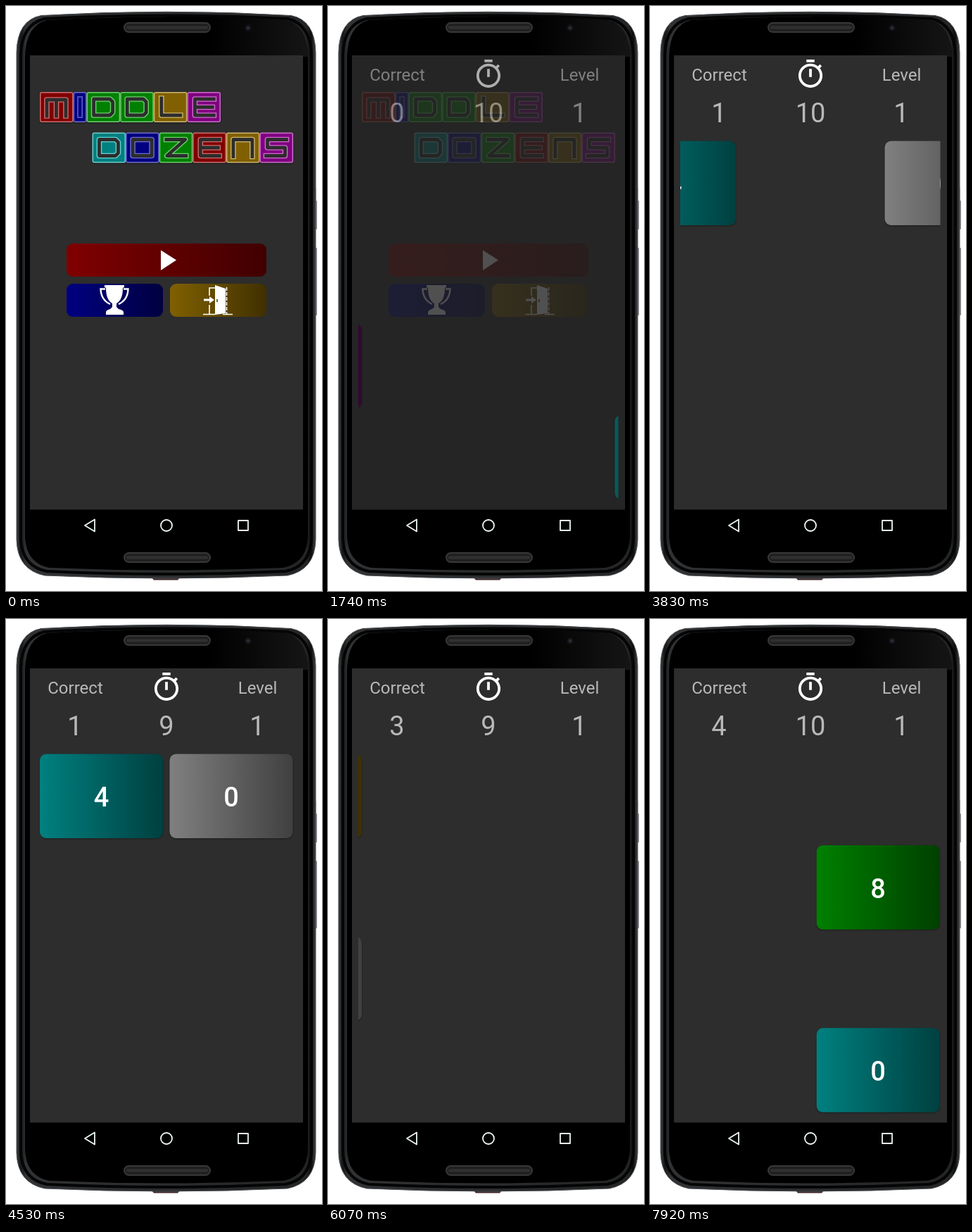
Write an HTML page that moves like this. It is 449 px wide and 830 px high and loops after 8000 ms.

```html
<!DOCTYPE html>
<html lang="en">
<head>
<meta charset="utf-8">
<title>Number game</title>
<style>
  html, body { margin: 0; width: 100%; height: 100%; overflow: hidden; background: #fff; }
  svg { display: block; width: 449px; height: 830px; }
  text { font-family: Roboto, sans-serif; text-anchor: middle; }
  .label { font-size: 24px; fill: #b9b9b9; }
  .count { font-size: 38px; fill: #b9b9b9; }
  .card text { font-size: 38px; font-weight: 500; fill: #fff; }
  .shade { filter: drop-shadow(0 1px 1px rgba(0, 0, 0, .35)); }
</style>
</head>
<body>
<svg viewBox="0 0 449 830">
  <defs id="defs">
    <linearGradient id="gloss" x1="0" y1="0" x2="1" y2="0">
      <stop offset=".3" stop-color="#000"/><stop offset="1" stop-color="#151515"/>
    </linearGradient>
    <linearGradient id="rim" x1="0" y1="0" x2="1" y2="0">
      <stop offset="0" stop-color="#3c3e40"/><stop offset=".014" stop-color="#141516"/>
      <stop offset=".03" stop-color="#303234"/><stop offset=".97" stop-color="#242526"/>
      <stop offset=".985" stop-color="#0c0c0c"/><stop offset="1" stop-color="#414345"/>
    </linearGradient>
    <clipPath id="board"><rect x="43" y="180" width="369.5" height="530"/></clipPath>
  </defs>

  <!-- phone -->
  <g fill="#8c8e92">
    <rect x="438" y="258" width="2.5" height="18"/>
    <rect x="438" y="276" width="4" height="41" rx="1"/>
    <rect x="438" y="343" width="4" height="96" rx="1"/>
  </g>
  <path d="M206 810H248L244 814.500H210Z" fill="#40282a"/>
  <path d="M15 66Q16 20 50 13.500Q228 3 405 13.500Q439 20 440 66V757Q439 800 400 808Q228 816 55 808Q16 800 15 757Z" fill="url(#rim)" stroke="#4c4f53"/>
  <path d="M21 70Q22 26 55 18Q228 9 400 18Q433 26 434 70V754Q433 795 397 802Q228 810 58 802Q22 795 21 754Z" fill="none" stroke="#050505" stroke-width="4"/>
  <path d="M27 72Q28 28 58 20Q228 11 397 20Q428 28 429 72V752Q428 790 394 797Q228 804 61 797Q28 790 27 752Z" fill="#000"/>
  <path d="M228 15Q330 15 397 20Q428 28 429 72H228Z" fill="url(#gloss)"/>
  <circle cx="344" cy="31" r="5" fill="#101114"/>
  <circle cx="344" cy="31" r="2.500" fill="#292b31"/>
  <g fill="#202020" stroke="#383838" stroke-width="2">
    <rect x="168" y="24" width="122" height="13" rx="6.500"/>
    <rect x="168" y="776" width="122" height="13" rx="6.500"/>
  </g>
  <path d="M173 30.500H285M173 782.500H285" stroke="#303030" stroke-width="4" stroke-linecap="round"/>
  <rect x="34" y="70" width="388" height="690" fill="#000"/>
  <g fill="none" stroke="#eef6f6" stroke-width="1.800" stroke-linejoin="round">
    <path d="M112 737L126 728.500V745.500Z"/>
    <circle cx="228" cy="737" r="8"/>
    <rect x="330" y="730" width="14" height="14"/>
  </g>

  <g id="menu">
    <rect x="34" y="70" width="388" height="644.500" fill="#2d2d2d"/>
    <g id="title" class="shade"></g>
    <g id="buttons"></g>
    <path d="M220 346.500L242 360.500L220 375Z" fill="#fff"/>
    <g transform="translate(133 396)">
      <path d="M7 0H35V3L33 4Q33 21 24 26V31L27 34Q33 35 34 38V42H9V38Q10 35 15 34L18 31V26Q9 21 9 4L7 3Z" fill="#fff"/>
      <path d="M8 5.500H1.500Q2 21 15 27M34 5.500H40.500Q40 21 27 27" fill="none" stroke="#fff" stroke-width="2.400"/>
    </g>
    <g transform="translate(280 396)" fill="none" stroke="#fff" stroke-width="1.600">
      <path d="M17 0L32 5V40L17 42Z" fill="#fff" stroke="none"/>
      <path d="M0 41.500H17M28 41.500H42M9 41V28M9 15V4H17"/>
      <path d="M33.500 3V41" stroke-dasharray="5 2"/>
      <path d="M1 19.500H9V16L16 21L9 26V22.500H1Z" fill="#fff" stroke="none"/>
      <path d="M20 20V24" stroke="#4c3a05"/>
    </g>
  </g>

  <g id="game">
    <rect x="34" y="70" width="388" height="644.500" fill="#2d2d2d"/>
    <text class="label" x="98.500" y="106">Correct</text>
    <text class="label" x="357.500" y="106">Level</text>
    <path transform="translate(205.200 74.100) scale(1.900)" fill="#fff" d="M15 1H9v2h6V1zm-4 13h2V8h-2v6zm8.030-6.610l1.420-1.420c-.43-.51-.9-.99-1.410-1.410l-1.420 1.420C16.070 4.740 14.120 4 12 4c-4.970 0-9 4.030-9 9s4.020 9 9 9 9-4.030 9-9c0-2.120-.74-4.070-1.970-5.610zM12 20c-3.870 0-7-3.130-7-7s3.130-7 7-7 7 3.130 7 7-3.130 7-7 7z"/>
    <text class="count" id="score" x="98" y="165">0</text>
    <text class="count" id="timer" x="228" y="165">10</text>
    <text class="count" x="357" y="165">1</text>
    <g id="cards" clip-path="url(#board)"></g>
  </g>
</svg>
<script>
const LOOP = 8000, STEP = 76.6, WIDTH = 175;
const $ = id => document.getElementById(id);

function add(parent, tag, attrs) {
  const el = document.createElementNS('http://www.w3.org/2000/svg', tag);
  for (const k in attrs) el.setAttribute(k, attrs[k]);
  return parent.appendChild(el);
}

// Button and card colours fade to half brightness on the right
const colors = {
  red: [128, 0, 0], blue: [0, 0, 128], gold: [128, 96, 0], purple: [128, 0, 128],
  teal: [0, 128, 128], green: [0, 128, 0], gray: [128, 128, 128]
};
const rgb = c => `rgb(${c})`;
for (const name in colors) {
  const g = add($('defs'), 'linearGradient', { id: name });
  const c = colors[name];
  add(g, 'stop', { offset: 0, 'stop-color': rgb(c) });
  add(g, 'stop', { offset: 1, 'stop-color': rgb(c.map(v => v / 2)) });
}

const button = (x, y, width, color) => add($('buttons'), 'rect',
  { x, y, width, height: 47, rx: 9, fill: `url(#${color})` });
button(86, 337, 284, 'red');
button(86, 394, 137, 'blue');
button(233, 394, 137, 'gold');

// Neon title tiles
const glyphs = {
  M: 'M10 34V11H37V34M23.5 11V34', I: 'M9.5 10V33', D: 'M10 10H33L37 14V29L33 33H10Z',
  L: 'M11 9V33H38', E: 'M38 10H11V33H38M11 21.5H36', O: 'M10 10H37V33H10Z',
  Z: 'M10 10H37L11 33H38', N: 'M10 34V10H37V34', S: 'M38 10H11V21.5H36V33H9'
};
function word(text, x, y, names) {
  [...text].forEach((ch, i) => {
    const base = colors[names[i]], width = ch === 'I' ? 19 : 47.6;
    const light = rgb(base.map(v => v * .75 + 110));
    const g = add($('title'), 'g', { transform: `translate(${x} ${y})`, fill: 'none' });
    add(g, 'rect', { x: .8, y: .8, width: width - 1.6, height: 41.5, rx: 2,
      fill: rgb(base), stroke: light, 'stroke-width': 1.5 });
    const inner = ch === 'I' ? rgb(base) : '#2d2d2d';
    [[light, 7.6], [inner, 4.8]].forEach(([stroke, w]) => add(g, 'path',
      { d: glyphs[ch], stroke, 'stroke-width': w, 'stroke-linejoin': 'round', 'stroke-linecap': 'square' }));
    x += width;
  });
}
word('MIDDLE', 48, 122, ['red', 'blue', 'green', 'green', 'gold', 'purple']);
word('DOZENS', 122.5, 179.5, ['teal', 'blue', 'green', 'red', 'gold', 'purple']);

// Each card: colour, number, column, row
const rounds = [
  { at: 1430, go: 1740, time: 530, cards: [['purple', 9, 0, 2], ['teal', 4, 1, 3]] },
  { at: 3520, go: 3520, time: 680, cards: [['teal', 4, 0, 0], ['gray', 0, 1, 0]] },
  { at: 4760, go: 4760, time: 680, cards: [['blue', 7, 0, 3], ['red', 2, 1, 0]] },
  { at: 6070, go: 6146, time: 680, cards: [['gold', 6, 0, 0], ['gray', 3, 0, 2]] },
  { at: 7300, go: 7300, time: 680, cards: [['green', 8, 1, 1], ['teal', 0, 1, 3]] }
];
const ticks = [[0, 10], [2280, 9], [3060, 8], [3520, 10], [4530, 9], [4760, 10],
  [5770, 9], [6146, 10], [7070, 9], [7300, 10]];

for (const round of rounds) {
  round.layer = add($('cards'), 'g', {});
  round.items = round.cards.map(([color, number, col, row]) => {
    const el = add(round.layer, 'g', { class: 'card' });
    add(el, 'rect', { class: 'shade', width: WIDTH, height: 119.5, rx: 9, fill: `url(#${color})` });
    add(el, 'text', { x: 87.5, y: 74.5 }).textContent = number;
    return { el, x: 48 + col * 184.5, y: 191.5 + row * 129.6, side: col ? 1 : -1 };
  });
}

const stepsSince = (t, start) => Math.max(0, Math.floor((t - start) / STEP));
const ease = p => (1 - Math.cos(Math.PI * Math.min(1, p))) / 2;

function draw(t) {
  const fade = t < 1430 ? 0 : stepsSince(t, 1430) + 1;
  $('menu').setAttribute('opacity', fade > 7 ? 0 : 1 - fade * .085);
  $('game').setAttribute('opacity', Math.min(1, fade * .13));

  const current = Math.max(0, rounds.filter(r => t >= r.at).length - 1);
  $('score').textContent = current;
  $('timer').textContent = ticks.filter(k => t >= k[0]).pop()[1];
  rounds.forEach((r, i) => {
    r.layer.setAttribute('display', i === current ? 'inline' : 'none');
    if (i !== current) return;
    const left = WIDTH * (1 - ease(stepsSince(t, r.go) * STEP / r.time));
    for (const c of r.items)
      c.el.setAttribute('transform', `translate(${c.x + c.side * left} ${c.y})`);
  });
}

const begin = performance.now();
function frame() {
  draw((performance.now() - begin) % LOOP);
  requestAnimationFrame(frame);
}
frame();
</script>
</body>
</html>
```
